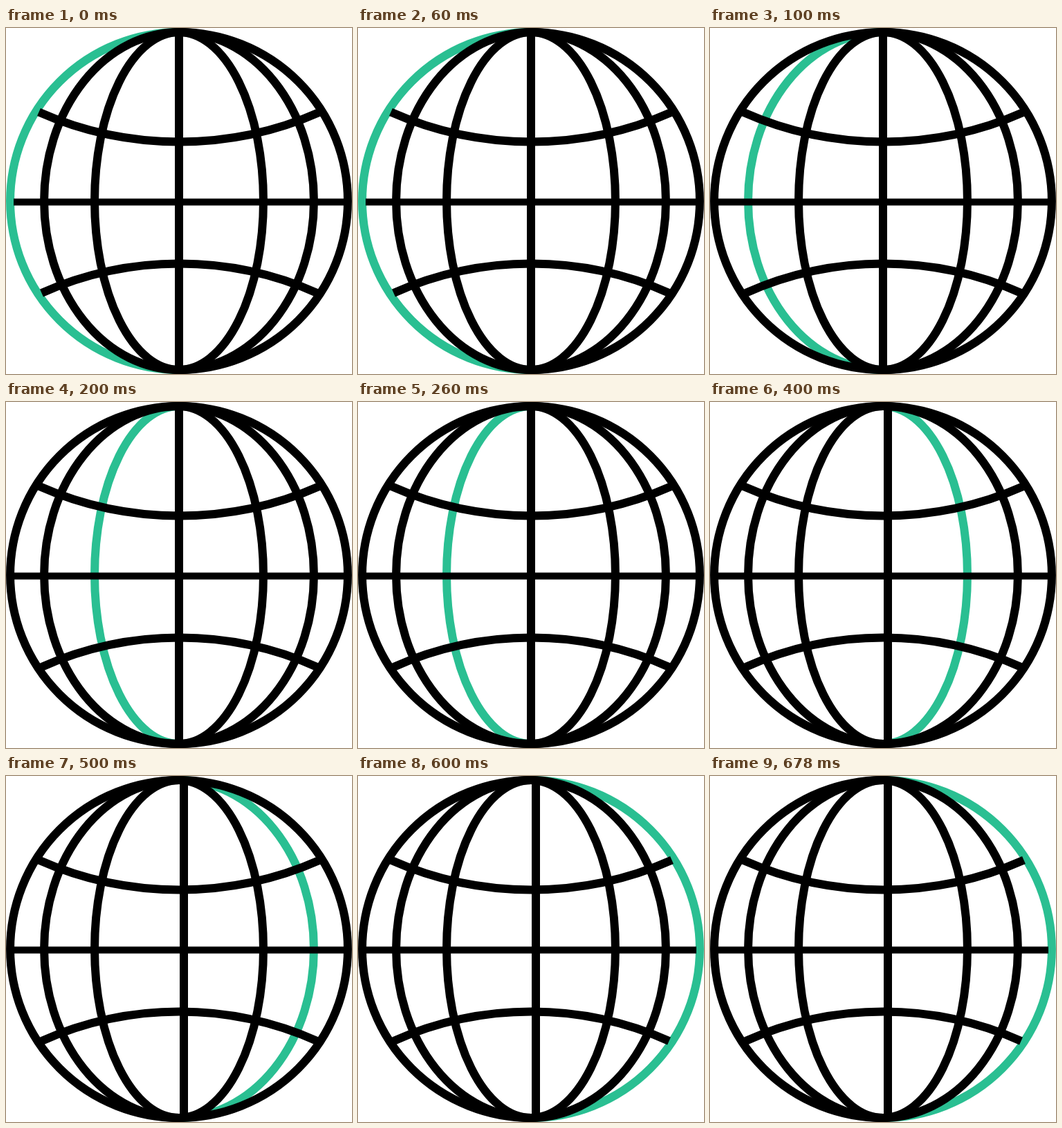
Recreate the animation shown at these times as an HTML page. Size 500 by 500 pixels, loop 730 ms.

```html
<!DOCTYPE html>
<html lang="en">
<head>
<meta charset="utf-8">
<title>Globe</title>
<style>
  html, body { margin: 0; width: 100%; height: 100%; overflow: hidden; background: #fff; }
  svg { display: block; width: 100vw; height: 100vh; }
</style>
</head>
<body>
<svg viewBox="0 0 500 500" fill="none" stroke="#000" stroke-width="12">
  <g id="highlight" stroke="#2abf92"></g>
  <g id="meridians"></g>
  <path d="M47.5 121.5A501 501 0 0 0 453.5 121.5"/>
  <path d="M51.5 383A488 488 0 0 1 449.5 383"/>
  <path d="M11 251.5H489" stroke-width="10"/>
</svg>
<script>
  const LOOP = 730, STEP = 100;
  const RADII = [-244, -195, -122, 0, 122, 195, 244];
  const MIDDLE = 3;
  const highlight = document.getElementById('highlight');
  const meridians = document.getElementById('meridians');

  const lines = RADII.map(radius => {
    const path = document.createElementNS('http://www.w3.org/2000/svg', 'path');
    const sweep = radius < 0 ? 0 : 1;
    path.setAttribute('d', radius
      ? `M250 6A${Math.abs(radius)} 244 0 0 ${sweep} 250 494`
      : 'M250 6V494');
    return path;
  });

  let shown = -1;

  function render(time) {
    const active = Math.min(RADII.length - 1, Math.floor(time % LOOP / STEP));
    if (active === shown) return;
    shown = active;
    lines.forEach((line, i) => (i === active ? highlight : meridians).append(line));
    // The central line sits to the right once the highlight reaches it.
    lines[MIDDLE].setAttribute('transform', `translate(${active < MIDDLE ? 0 : 7} 0)`);
  }

  const start = performance.now();
  function tick() {
    render(performance.now() - start);
    requestAnimationFrame(tick);
  }
  tick();
</script>
</body>
</html>
```
